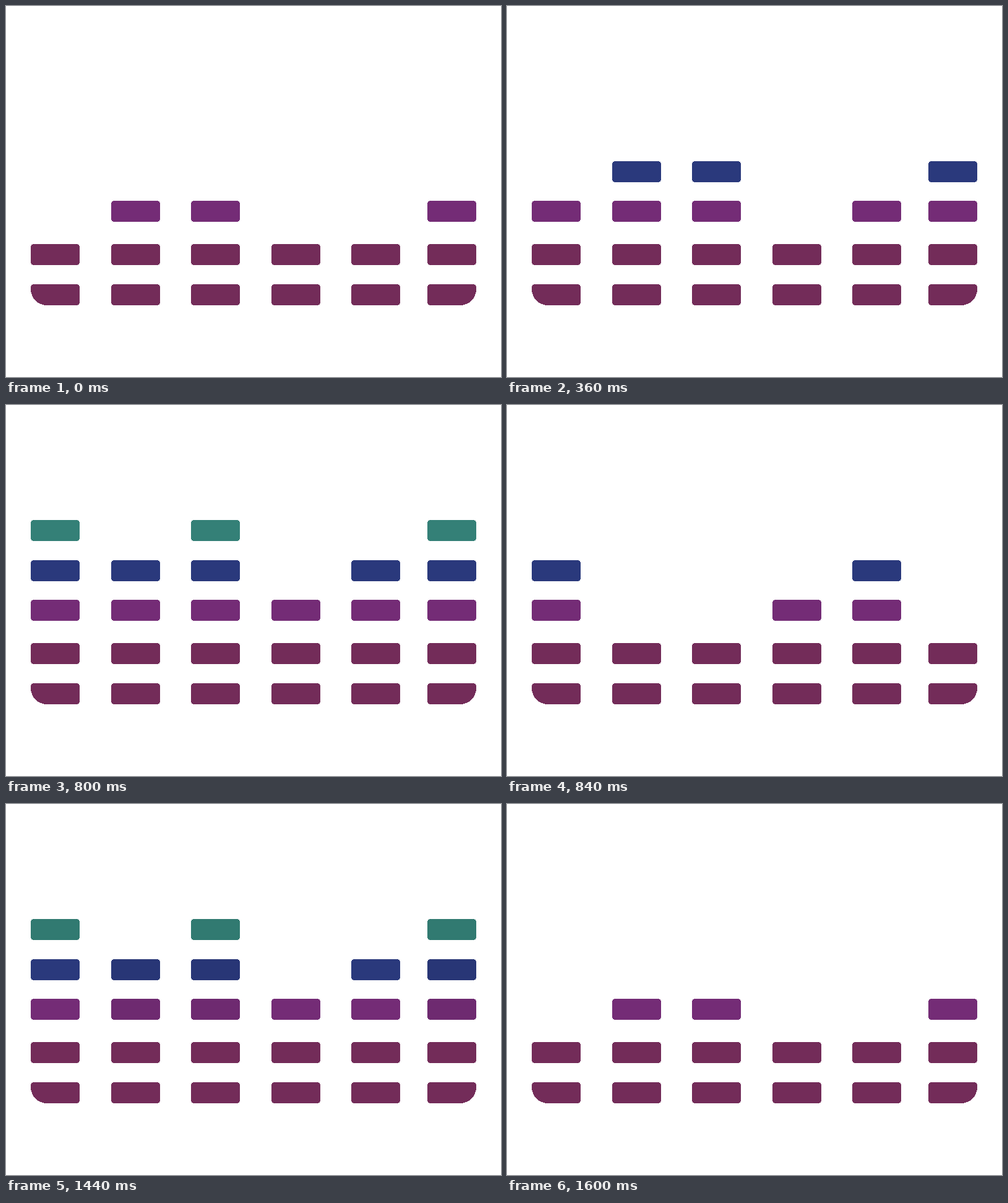
Recreate the animation shown at these times as an HTML page. Size 800 by 600 pixels, loop 1.92 s.

```html
<!DOCTYPE html>
<html lang="en">
<head>
<meta charset="utf-8">
<title>Equalizer</title>
<style>
  html, body { margin: 0; width: 100%; height: 100%; overflow: hidden; background: #fff; }
  svg { display: block; width: 800px; height: 600px; shape-rendering: crispEdges; }
</style>
</head>
<body>
<svg id="stage" viewBox="0 0 800 600"></svg>
<script>
const LOOP = 1920, STEP = 40, WIDTH = 79, HEIGHT = 34;
const columns = [40, 170, 299, 429, 558, 681];
// Rows run from bottom to top.
const rows = [
  { y: 450, rgb: [115, 44, 89] },
  { y: 385, rgb: [115, 44, 89] },
  { y: 315, rgb: [116, 44, 118] },
  { y: 251, rgb: [42, 57, 124] },
  { y: 186, rgb: [52, 128, 119] }
];
// Number of lit blocks per column from each start time on.
const phases = [
  { start: 200, levels: [3, 4, 4, 2, 3, 4] },
  { start: 560, levels: [5, 4, 5, 3, 4, 5] },
  { start: 840, levels: [4, 2, 2, 3, 4, 2] },
  { start: 1320, levels: [5, 4, 5, 3, 4, 5], dimAt: 1560 },
  { start: 1600, levels: [2, 3, 3, 2, 2, 3] }
];

function blockPath(x, y, bottomLeft, bottomRight) {
  const r = 5, right = x + WIDTH, bottom = y + HEIGHT;
  const arc = (radius, toX, toY) => `A${radius} ${radius} 0 0 1 ${toX} ${toY}`;
  return `M${x + r} ${y}H${right - r}${arc(r, right, y + r)}` +
    `V${bottom - bottomRight}${arc(bottomRight, right - bottomRight, bottom)}` +
    `H${x + bottomLeft}${arc(bottomLeft, x, bottom - bottomLeft)}` +
    `V${y + r}${arc(r, x + r, y)}Z`;
}

const stage = document.getElementById("stage");
const blocks = rows.flatMap(({ y, rgb }, row) => columns.map((x, column) => {
  const path = document.createElementNS("http://www.w3.org/2000/svg", "path");
  const isCorner = edge => row === 0 && column === edge;
  path.setAttribute("d", blockPath(x, y, isCorner(0) ? 26 : 5, isCorner(5) ? 26 : 5));
  stage.append(path);
  return { path, row, column, rgb };
}));

function draw(now) {
  const time = Math.floor((now % LOOP) / STEP) * STEP;
  const count = phases.length;
  const index = (phases.filter(p => p.start <= time).length + count - 1) % count;
  const phase = phases[index];
  const before = phases[(index + count - 1) % count].levels;
  const after = phases[(index + 1) % count].levels;
  const age = (time - phase.start + LOOP) % LOOP;
  const fadeIn = Math.min(1, 0.8 + 0.2 * age / 160);

  for (const { path, row, column, rgb } of blocks) {
    const isNew = row >= before[column];
    const isLeaving = row >= after[column];
    let shade = isNew ? fadeIn : 1;
    if (isLeaving && time >= phase.dimAt) shade = 0.885;
    path.style.display = row < phase.levels[column] ? "" : "none";
    path.style.fill = `rgb(${rgb.map(v => Math.round(v * shade))})`;
  }
}

const origin = performance.now();
function tick() {
  draw(performance.now() - origin);
  requestAnimationFrame(tick);
}
tick();
</script>
</body>
</html>
```
